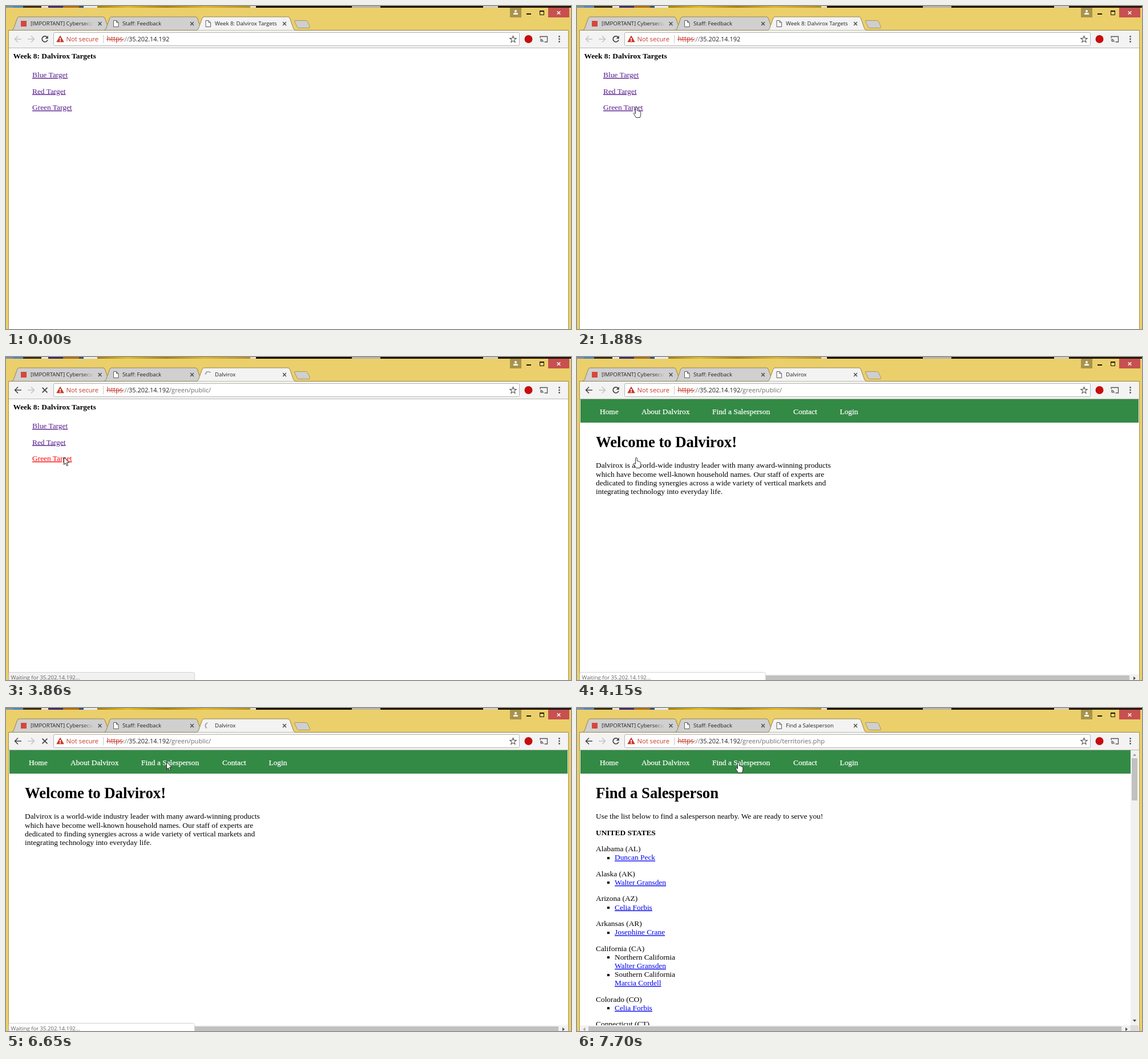
Write an HTML page that moves like this. It is 990x566 px and loops after 8 s.

```html
<!DOCTYPE html>
<html lang="en">
<head>
<meta charset="utf-8">
<title>Browser walkthrough</title>
<style>
html, body { margin: 0; width: 100%; height: 100%; overflow: hidden; background: #fff; }
svg { display: block; width: 990px; height: 566px; }
text { white-space: pre; }
.serif { font-family: "Liberation Serif", "Times New Roman", serif; font-size: 13.4px; }
.ui { font-family: "Open Sans", "Noto Sans", sans-serif; font-size: 9.6px; }
.b { font-weight: bold; }
.u { text-decoration: underline; }
.nav { stroke: #fff; stroke-width: .25px; }
rect { shape-rendering: crispEdges; }
.round { shape-rendering: auto; }
</style>
</head>
<body>
<svg id="stage" viewBox="0 0 990 566" xmlns="http://www.w3.org/2000/svg"></svg>
<script>
const LOOP = 8000;
const BRAND = 'Dalvirox';
const HOST = '35.202.14.192';

// Drawing helpers
const rect = (x, y, w, h, fill, more = '') =>
  `<rect x="${x}" y="${y}" width="${w}" height="${h}" fill="${fill}" ${more}/>`;
const path = (d, fill, stroke = 'none', width = 1, more = '') =>
  `<path d="${d}" fill="${fill}" stroke="${stroke}" stroke-width="${width}" ${more}/>`;
const text = (x, y, s, cls, fill = '#000', size = 0, more = '') =>
  `<text x="${x}" y="${y}" class="${cls}" fill="${fill}" ${size ? `style="font-size:${size}px"` : ''} ${more}>${s}</text>`;
const group = (id, body, more = '') => `<g id="${id}" ${more}>${body}</g>`;
const cross = (x, y, r, color, width) =>
  path(`M${x - r} ${y - r}l${2 * r} ${2 * r}m0 ${-2 * r}l${-2 * r} ${2 * r}`, 'none', color, width);

// Window frame
function desktop() {
  const bits = [
    [0, 12, '#7d8fa3'], [12, 18, '#4f86c0'], [30, 32, '#3b2a12'], [62, 12, '#e8e4da'],
    [74, 26, '#3d2a6e'], [100, 28, '#b06f10'], [128, 8, '#2d4f86'], [136, 24, '#e9edf2'],
    [160, 268, 'url(#gold)'], [428, 10, '#e6dcc0'], [438, 168, '#15100a'], [606, 50, '#b9b4a6'],
    [656, 180, '#1d140b'], [836, 26, '#d8d0bb'], [862, 128, '#24170c']
  ];
  return bits.map(([x, w, c]) => rect(x, 0, w, 3, c)).join('');
}

function caption() {
  return rect(883, 3, 20, 17, '#a8934c') +
    '<circle cx="893" cy="9" r="2" fill="#fff"/>' +
    path('M889 15V13.6Q889 11.8 893 11.8T897 13.6V15Z', '#fff') +
    rect(912, 13, 8, 2, '#111') +
    path('M935.5 9H942.5V15.5H935.5Z', 'none', '#111', 1) + rect(935, 8, 8, 2, '#111') +
    rect(950, 3, 37, 17, '#c75050') + cross(968.5, 12, 2.8, '#fff', 1.4);
}

const tabShape = (x, right, fill) =>
  path(`M${x} 42.5Q${x + 2.5} 41.5 ${x + 3.5} 39L${x + 9.5} 22Q${x + 10.5} 19 ${x + 13} 19H${right - 13}` +
    `Q${right - 10.5} 19 ${right - 9.5} 22L${right - 3.5} 39Q${right - 2.5} 41.5 ${right} 42.5`, fill, '#95854a', 1);
const docIcon = x =>
  path(`M${x} 25.5H${x + 5}L${x + 8.5} 29V36.5H${x}ZM${x + 5} 25.5V29H${x + 8.5}`, '#fff', '#5c5c5c', 1);
const closeTab = x => cross(x, 31, 2.9, '#4a4a4a', 1.4);

function tabs() {
  return tabShape(10, 183, '#d0d0d0') + tabShape(172, 345, '#d0d0d0') +
    rect(26, 26, 10, 10, '#d5473c') +
    text(43, 34.4, '[IMPORTANT] Cybersecu', 'ui', 'url(#fade)') + closeTab(164.5) +
    docIcon(188.5) + text(204, 34.4, 'Staff: Feedback', 'ui', '#222') + closeTab(326) +
    path('M506 25.5H525.5Q527.5 25.5 528.5 27.5L532.5 36.5Q533 38.5 531 38.5H513Q511 38.5 510 36.5L505.5 27Q505 25.5 506 25.5Z',
      '#cfcfcf', '#a89858', 1) +
    rect(5, 42, 980, 31, '#f3f3f3') + rect(5, 42, 980, 1, '#95854a') +
    tabShape(334, 507, '#f3f3f3') + closeTab(488) +
    group('doc', docIcon(350)) +
    group('spinner', path('M-1.2 -5A5.1 5.1 0 0 0 -2.6 4.4', 'none', '#9a9a9a', 1.6)) +
    text(366, 34.4, '', 'ui', '#222', 0, 'id="title"');
}

const arrow = (x, dir, color) =>
  path(`M${x - dir * 6} 58H${x + dir * 5}M${x} 52.5L${x + dir * 5.4} 58L${x} 63.5`, 'none', color, 1.6);

function star(cx, cy) {
  const pts = Array.from({ length: 10 }, (_, i) => {
    const r = i % 2 ? 2.6 : 6, a = i * Math.PI / 5 - Math.PI / 2;
    return (cx + r * Math.cos(a)).toFixed(1) + ' ' + (cy + r * Math.sin(a)).toFixed(1);
  });
  return path('M' + pts.join('L') + 'Z', 'none', '#555', 1.1);
}

function toolbar() {
  const red = '#c5392b';
  return group('backOff', arrow(21, -1, '#c4c4c4')) + group('backOn', arrow(21, -1, '#444')) +
    arrow(44, 1, '#c4c4c4') +
    group('reload', path('M72 54.6A5 5 0 1 0 72.9 59.5', 'none', '#444', 1.7) + path('M73.8 52V57.2H68.6Z', '#444')) +
    group('stop', cross(68, 58, 4.4, '#444', 1.7)) +
    rect(83.5, 46.5, 816, 23, '#fff', 'class="round" rx="2" stroke="#b5b5b5"') +
    path('M95 52L101.3 63H88.7Z', red, red, .6) + rect(94.4, 55.5, 1.3, 3.8, '#fff') + rect(94.4, 60.4, 1.3, 1.3, '#fff') +
    text(105.5, 62, 'Not secure', 'ui', red, 11.2) + rect(170, 51, 1, 14, '#c8c8c8') +
    text(176.5, 62, 'https', 'ui', red, 11.7) + rect(176, 58, 30, 1, red) +
    text(205.3, 62, '://', 'ui', '#6e6e6e', 10.2) + text(215, 62, HOST, 'ui', '#222', 10.95) +
    text(286, 62, '', 'ui', '#6e6e6e', 11.1, 'id="url"') +
    star(888.5, 58.5) + '<circle cx="915.5" cy="58" r="7" fill="#c70d0d"/>' +
    path('M936 56V53.5H948.5V63H943.5M936 58A5 5 0 0 1 941 63M936 60.5A2.5 2.5 0 0 1 938.5 63', 'none', '#555', 1.3) +
    [53.5, 58, 62.5].map(y => `<circle cx="969.5" cy="${y}" r="1.4" fill="#555"/>`).join('') +
    rect(5, 73, 980, 1, '#b8b6b2');
}

// Page bodies
function targets() {
  const links = ['Blue', 'Red', 'Green'].map((name, i) =>
    text(46, 125 + i * 28.5, name + ' Target', 'serif u', '#551a8b', 0, `id="link${name}"`));
  return text(12.5, 92.2, `Week 8: ${BRAND} Targets`, 'serif b') + links.join('');
}

function nav(width) {
  const items = [[40, 'Home'], [113, 'About ' + BRAND], [237, 'Find a Salesperson'], [379, 'Contact'], [460.5, 'Login']];
  return rect(6, 74, width, 41, '#338a45') + items.map(([x, s]) => text(x, 100, s, 'serif nav', '#fff')).join('');
}

const triangle = (x, y, dx, dy, color) =>
  path(`M${x + dx * 2} ${y + dy * 2}L${x - dx * 2 - dy * 3.2} ${y - dy * 2 - dx * 3.2}` +
    `L${x - dx * 2 + dy * 3.2} ${y - dy * 2 + dx * 3.2}Z`, color);

const hbar = right => rect(6, 556, right - 6, 10, '#f1f1f1') + rect(20, 558, right - 36, 8, '#c1c1c1') +
  triangle(12.5, 563, -1, 0, '#a3a3a3') + triangle(right - 7, 563, 1, 0, '#505050');

function welcome() {
  const lines = [
    BRAND + ' is a world-wide industry leader with many award-winning products',
    'which have become well-known household names. Our staff of experts are',
    'dedicated to finding synergies across a wide variety of vertical markets and',
    'integrating technology into everyday life.'
  ];
  return nav(978) + text(33, 158, `Welcome to ${BRAND}!`, 'serif b', '#000', 26.7) +
    lines.map((s, i) => text(33, 194.4 + i * 15.25, s, 'serif')).join('') + hbar(984);
}

function territories() {
  const states = [
    ['Alabama (AL)', '*Duncan Peck'],
    ['Alaska (AK)', '*Walter Gransden'],
    ['Arizona (AZ)', '*Celia Forbis'],
    ['Arkansas (AR)', '*Josephine Crane'],
    ['California (CA)', '-Northern California', 'Walter Gransden', '-Southern California', 'Marcia Cordell'],
    ['Colorado (CO)', '*Celia Forbis'],
    ['Connecticut (CT)']
  ];
  let y = 251.2, list = '';
  for (const [name, ...rows] of states) {
    list += text(33, y, name, 'serif');
    for (const row of rows) {
      y += 15.15;
      const plain = row[0] === '-';
      if (plain || row[0] === '*') list += rect(53, Math.round(y - 5.5), 4, 4, '#000');
      list += text(66, y, row.replace(/^[-*]/, ''), plain ? 'serif' : 'serif u', plain ? '#000' : '#0000ee');
    }
    y += 28.45;
  }
  return nav(964) + text(33, 158, 'Find a Salesperson', 'serif b', '#000', 26.7) +
    text(33, 194.4, 'Use the list below to find a salesperson nearby. We are ready to serve you!', 'serif') +
    text(33, 222.7, 'UNITED STATES', 'serif b') + list +
    rect(6, 556, 979, 10, '#fff') + hbar(970) + rect(970, 556, 14, 10, '#dcdcdc') +
    rect(970, 74, 14, 482, '#f1f1f1') + rect(972, 88, 10, 74, '#c1c1c1') +
    triangle(977, 82, 0, -1, '#a3a3a3') + triangle(977, 548, 0, 1, '#505050');
}

const pointer = path('M.5 .5V13.6L3.4 10.9L5.5 15.7L7.5 14.8L5.4 10.1H9.4Z', '#fff', '#222', 1);
const hand = path('M0 1.6Q1.4 -.2 2.8 1.6V6.8Q5 6.2 5.6 7.6Q7.2 7 7.8 8.6Q9.4 8.6 9.2 11V14.4L7.8 19H1' +
  'L-2.8 12.8Q-3.6 10.6 -2 10.4L0 12.2Z', '#fff', '#222', .9);

document.getElementById('stage').innerHTML =
  `<defs>
    <linearGradient id="gold"><stop offset="0" stop-color="#a67c08"/><stop offset=".2" stop-color="#e0bd1c"/>
      <stop offset=".45" stop-color="#a87f0a"/><stop offset=".7" stop-color="#dfb622"/><stop offset="1" stop-color="#b58b2a"/></linearGradient>
    <linearGradient id="fade" gradientUnits="userSpaceOnUse" x1="134" x2="154" y1="0" y2="0">
      <stop offset="0" stop-color="#222"/><stop offset="1" stop-color="#222" stop-opacity="0"/></linearGradient>
  </defs>` +
  rect(0, 0, 990, 566, '#ebcf6b') + desktop() + caption() +
  rect(4, 42, 1, 524, '#a8934c') + rect(985, 42, 1, 524, '#a8934c') +
  rect(5, 73, 980, 493, '#fff') + tabs() + toolbar() +
  group('page0', targets()) + group('page1', welcome()) + group('page2', territories()) +
  group('bubble', path('M5 552.5H327.5Q330.5 552.5 330.5 555.5V567H5Z', '#f1f1f1', '#d2d2d2', 1, 'id="bubbleBox"') +
    text(8.5, 565.3, '', 'ui', '#626262', 9.55, 'id="status"')) +
  group('pointer', pointer) + group('hand', hand);

// Steps: each row holds from its time until the next
const HOVER = `https://${HOST}/green/public`;
const WAIT = `Waiting for ${HOST}...`;
const cursorSteps = [
  [0, -50, 0, 0], [120, 912, 58, 0], [260, 720, 38, 0], [420, 545, 28, 0], [560, 387, 24, 0], [720, 220, 110, 0],
  [860, 138, 163, 0], [980, 131, 160, 0], [1100, 126, 157, 0], [1260, 123, 160, 0], [1420, 119, 164, 0],
  [1560, 113, 169, 0], [1720, 107, 173, 1], [1860, 102, 176, 1], [2030, 99, 176, 1], [2190, 101, 175, 1],
  [2860, 101, 175, 0], [4150, 102, 175, 1], [4400, 104, 166, 0], [4560, 108, 148, 0], [4720, 112, 122, 0],
  [4860, 116, 92, 0], [5000, 120, 64, 0], [5120, 150, 46, 0], [5280, 205, 56, 0], [5420, 258, 82, 0],
  [5560, 281, 94, 1], [6230, 281, 94, 0], [7700, 281, 94, 1]
];
const statusSteps = [
  [0, '', 0], [2310, HOVER, .5], [2430, HOVER, 1], [3000, WAIT, 1], [5120, WAIT, .5], [5280, '', 0],
  [5930, HOVER + '/territories.php', .5], [6070, HOVER + '/territories.php', 1], [6370, WAIT, 1], [7340, '', 0]
];
const tabSteps = [
  [0, `Week 8: ${BRAND} Targets`, ''], [3860, BRAND, '/green/public/'],
  [7220, 'Find a Salesperson', '/green/public/territories.php']
];
const pageSteps = [[0, 0], [4000, 1], [7340, 2]];
const loadSteps = [[0, 0], [3000, 1], [4000, 0], [6370, 1], [7340, 0]];

const at = (steps, t) => steps.filter(s => s[0] <= t).pop().slice(1);
const el = id => document.getElementById(id);
const show = (id, on) => el(id).setAttribute('visibility', on ? 'visible' : 'hidden');
const label = (id, s) => { if (el(id).textContent !== s) el(id).textContent = s; };

function draw(t) {
  const [x, y, isHand] = at(cursorSteps, t);
  const [status, alpha] = at(statusSteps, t);
  const [title, url] = at(tabSteps, t);
  const [page] = at(pageSteps, t);
  const [loading] = at(loadSteps, t);

  for (let i = 0; i < 3; i++) show('page' + i, i === page);
  show('pointer', !isHand);
  show('hand', isHand);
  el('pointer').setAttribute('transform', `translate(${x} ${y})`);
  el('hand').setAttribute('transform', `translate(${x + .5} ${y + .5})`);

  label('title', title);
  label('url', url);
  show('backOff', !url);
  show('backOn', url);
  show('reload', !loading);
  show('stop', loading);
  show('doc', !loading);
  show('spinner', loading);
  const turn = Math.floor((t - 6650) / 125) * -34;
  el('spinner').setAttribute('transform', `translate(354.5 31) rotate(${turn})`);

  el('linkGreen').setAttribute('fill', t >= 2860 ? '#ff0000' : '#551a8b');
  label('status', status);
  el('bubble').setAttribute('opacity', alpha);
  el('bubbleBox').setAttribute('fill', page ? '#fff' : '#f1f1f1');
}

const start = performance.now();
function tick() {
  draw((performance.now() - start) % LOOP);
  requestAnimationFrame(tick);
}
tick();
</script>
</body>
</html>
```
